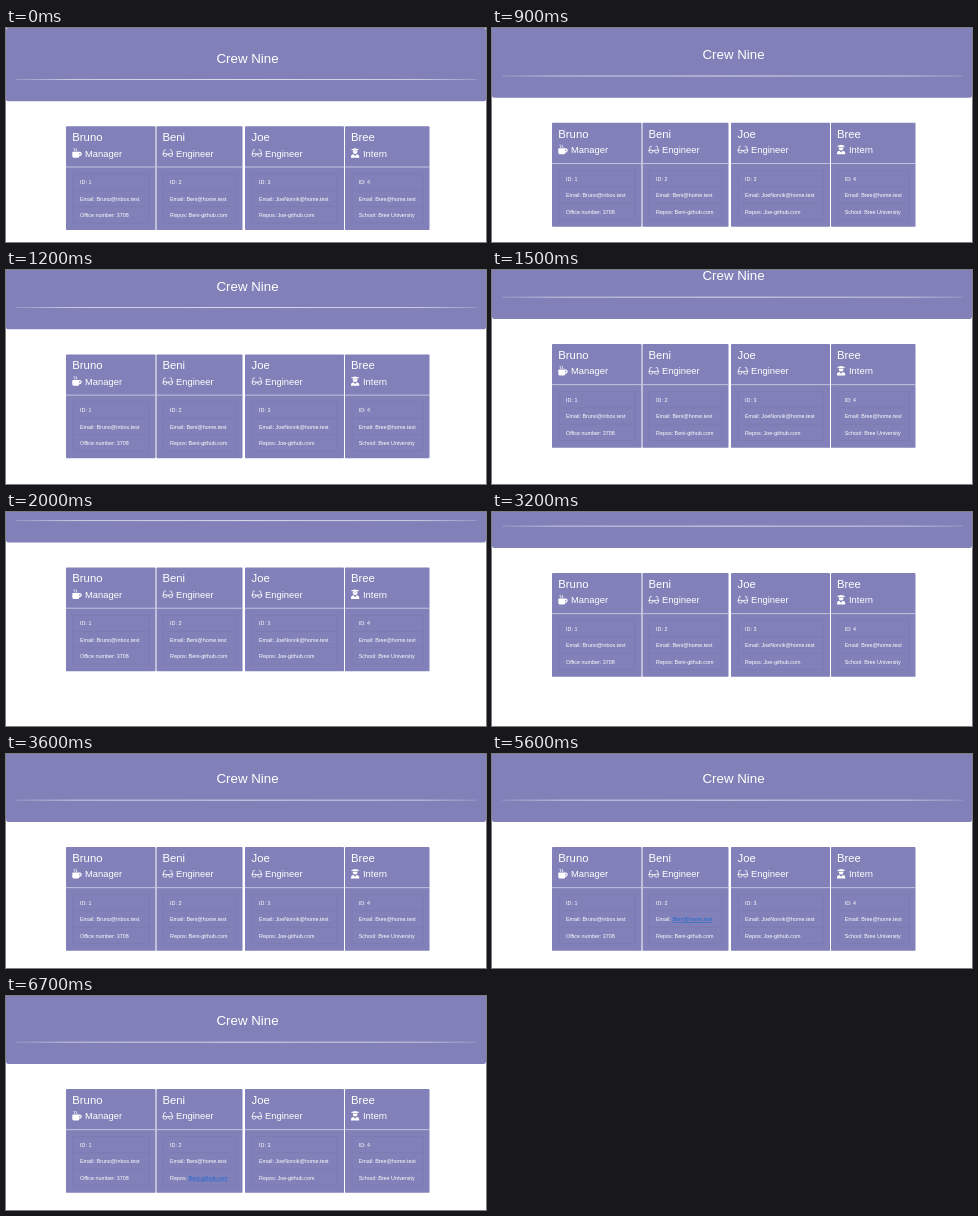
An HTML page that plays this animation: 480 px wide and 214 px high, repeating every 8 s.

```html
<!DOCTYPE html>
<html lang="en">
<head>
<meta charset="utf-8">
<title>Crew Nine</title>
<style>
  html, body { margin: 0; width: 100%; height: 100%; overflow: hidden; background: #fff; }
  svg { display: block; width: 100%; height: 100%; }
  text { font-family: "Liberation Sans", Arial, sans-serif; fill: #fff; }
  .title { font-size: 13.3px; text-anchor: middle; }
  .name { font-size: 11.3px; }
  .role { font-size: 9.4px; }
  .row { font-size: 5.4px; }
  .panel { fill: #8180b8; }
  .rule { fill: #d3d3e7; }
  .list { fill: none; stroke: #7776ae; stroke-width: .5; }
  .icon { fill: #fff; stroke: none; }
  .icon .line { fill: none; stroke: #fff; stroke-width: 44; stroke-linecap: round; }
  .hover { fill: #1f6ad0; text-decoration: underline; }
</style>
</head>
<body>
<svg viewBox="0 0 480 214">
  <defs>
    <linearGradient id="fade">
      <stop offset="0" stop-color="#fff" stop-opacity=".2"/>
      <stop offset=".12" stop-color="#fff" stop-opacity=".65"/>
      <stop offset=".5" stop-color="#fff" stop-opacity=".8"/>
      <stop offset=".88" stop-color="#fff" stop-opacity=".65"/>
      <stop offset="1" stop-color="#fff" stop-opacity=".2"/>
    </linearGradient>
  </defs>
  <g id="page"></g>
</svg>
<script>
const LOOP = 8000, STEP = 100;
const page = document.getElementById('page');

function add(parent, tag, attrs, text) {
  const el = document.createElementNS('http://www.w3.org/2000/svg', tag);
  for (const key in attrs) el.setAttribute(key, attrs[key]);
  if (text) el.textContent = text;
  parent.append(el);
  return el;
}

const icons = {
  mug: [
    ['M400 192H32C14 192 0 206 0 224v192c0 53 43 96 96 96h192c53 0 96-43 96-96h16c62 0 112-50 112-112s-50-112-112-112zm0 160h-16v-96h16c26 0 48 21 48 48s-22 48-48 48z'],
    ['M140 144c0-64-48-60-48-128M252 144c0-64-48-60-48-128', 'line']
  ],
  glasses: [
    ['M34 300L88 110q12-42 54-32l24 8M542 300L488 110q-12-42-54-32l-24 8', 'line'],
    ['M34 300q110-32 208 0l-8 72q-8 66-74 66h-54q-72 0-72-70zM542 300q-110-32-208 0l8 72q8 66 74 66h54q72 0 72-70zM242 316h92', 'line']
  ],
  graduate: [
    ['M224 0L10 60v20l214 60 214-60V60z'],
    ['M96 130v46a128 128 0 0 0 256 0v-46l-128 36z'],
    ['M0 512v-50c0-80 60-140 134-142l90 96 90-96c74 2 134 62 134 142v50z']
  ]
};

// x and right are card edges; the other positions follow from the inner offsets
const cards = [
  { x: 60, right: 149.5, left: 66.3, roleX: 79, rowX: 74, name: 'Bruno', role: 'Manager', icon: 'mug',
    rows: [['ID: ', '1'], ['Email: ', 'Bruno@inbox.test'], ['Office number: ', '3708']] },
  { x: 150.5, right: 236.5, left: 156.5, roleX: 170, rowX: 164, name: 'Beni', role: 'Engineer', icon: 'glasses',
    rows: [['ID: ', '2'], ['Email: ', 'Beni@home.test'], ['Repos: ', 'Beni-github.com']] },
  { x: 239, right: 338, left: 245.6, roleX: 259, rowX: 253, name: 'Joe', role: 'Engineer', icon: 'glasses',
    rows: [['ID: ', '3'], ['Email: ', 'JoeNorvik@home.test'], ['Repos: ', 'Joe-github.com']] },
  { x: 339, right: 423.5, left: 345, roleX: 357, rowX: 352.7, name: 'Bree', role: 'Intern', icon: 'graduate',
    rows: [['ID: ', '4'], ['Email: ', 'Bree@home.test'], ['School: ', 'Bree University']] }
];

function drawHeader() {
  add(page, 'rect', { class: 'panel', width: 480, height: 73.2, rx: 1.8 });
  add(page, 'text', { class: 'title', x: 241.5, y: 34.5 }, 'Crew Nine');
  add(page, 'rect', { x: 10, y: 51, width: 461, height: .9, fill: 'url(#fade)' });
}

function drawIcon(name, x) {
  const g = add(page, 'g', { class: 'icon', transform: `translate(${x} 120.3) scale(.0184)` });
  for (const [d, cls] of icons[name]) add(g, 'path', cls ? { d, class: cls } : { d });
}

// Returns the value part of each row
function drawCard(c) {
  const width = c.right - c.x;
  add(page, 'rect', { class: 'panel', x: c.x, y: 98.3, width, height: 103.8, rx: .9 });
  add(page, 'rect', { class: 'rule', x: c.x, y: 138.6, width, height: .8 });
  add(page, 'text', { class: 'name', x: c.left, y: 113 }, c.name);
  drawIcon(c.icon, c.left);
  add(page, 'text', { class: 'role', x: c.roleX, y: 128.5 }, c.role);
  const x = c.rowX - 6.7, w = c.right - 6.7 - x;
  add(page, 'path', { class: 'list', d: `M${x} 145.8h${w}v49.2h${-w}zm0 16.4h${w}m${-w} 16.4h${w}` });
  return c.rows.map(([label, value], i) => {
    const row = add(page, 'text', { class: 'row', x: c.rowX, y: 156.2 + i * 16.4, 'xml:space': 'preserve' });
    add(row, 'tspan', {}, label);
    return add(row, 'tspan', {}, value);
  });
}

drawHeader();
const values = cards.map(drawCard);
const [, email, repo] = values[1];

const easeOut = p => 1 - (1 - p) ** 1.66;
const smooth = p => p * p * (3 - 2 * p);
const linear = p => p;

// [start, end, from, to, easing]
const scrolls = [
  [800, 1500, 0, 24.3, linear],
  [1500, 1700, 24.3, 29.2, linear],
  [1800, 2400, 29.2, 57, easeOut],
  [2500, 2800, 57, 58.1, linear],
  [2900, 3600, 58.1, 5.3, smooth]
];

function scrollAt(t) {
  let y = 0;
  for (const [start, end, from, to, ease] of scrolls) {
    if (t >= start) y = from + (to - from) * ease(Math.min(1, (t - start) / (end - start)));
  }
  return y;
}

function render(time) {
  const t = Math.floor(time % LOOP / STEP) * STEP;
  page.setAttribute('transform', `translate(0 ${-scrollAt(t).toFixed(2)})`);
  email.classList.toggle('hover', t >= 5600 && t < 6300);
  repo.classList.toggle('hover', t >= 6700);
}

const begin = performance.now();
function tick() {
  render(performance.now() - begin);
  requestAnimationFrame(tick);
}
tick();
</script>
</body>
</html>
```
